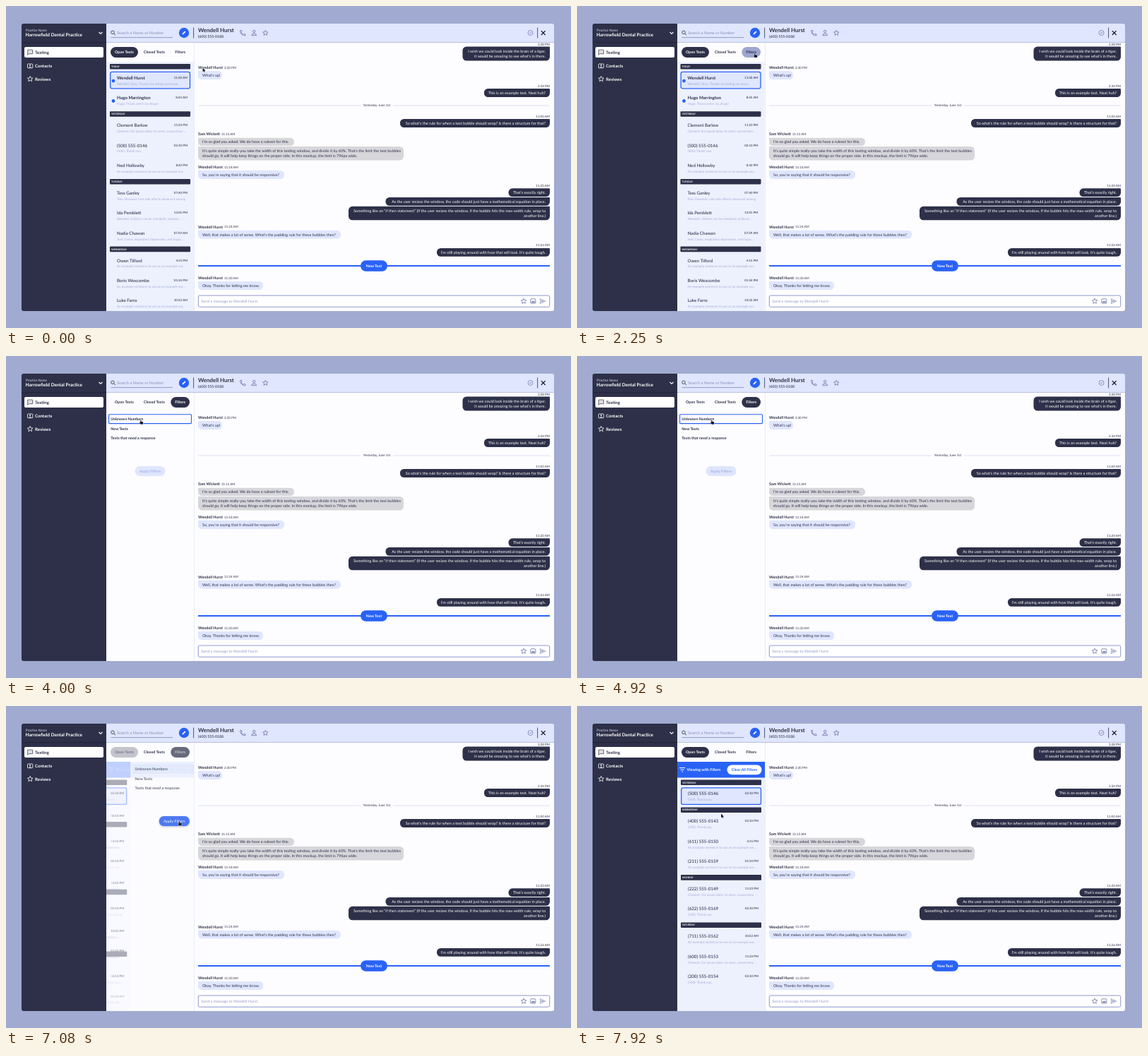
An HTML page with a canvas for the animation above (8 s loop, 800 px wide and 456 px high).

```html
<!DOCTYPE html>
<html lang="en">
<head>
<meta charset="utf-8">
<title>Texting inbox</title>
<style>
html, body { margin: 0; width: 100%; height: 100%; overflow: hidden; background: #a1abd1; }
canvas { display: block; width: 800px; height: 456px; }
</style>
</head>
<body>
<canvas id="stage"></canvas>
<script>
const LOOP = 8000;
const INK = '#2d3048', BLUE = '#2962f6', PALE = '#dfe6fd', WHITE = '#fdfdff';
const TINT = '#edf1fe', MUTED = '#a3abd3', ICON = '#6670a8', GREY = '#d6d6db';
const canvas = document.getElementById('stage');
const ctx = canvas.getContext('2d');
const dpr = window.devicePixelRatio || 1;
canvas.width = 800 * dpr;
canvas.height = 456 * dpr;
ctx.textRendering = 'geometricPrecision';

const mix = (a, b, k) => a + (b - a) * k;
const ease = (t, a, b) => {
  const k = Math.min(1, Math.max(0, (t - a) / (b - a)));
  return k * k * (3 - 2 * k);
};

function text(s, x, y, size, color = INK, weight = 400, align = 'left') {
  ctx.font = `${weight} ${size}px Lato, "Open Sans", sans-serif`;
  ctx.textAlign = align;
  ctx.fillStyle = color;
  ctx.fillText(s, x, y + size * 0.36);
}
const bold = (s, x, y, size, color, align) => text(s, x, y, size, color, 700, align);

function box(x0, y0, x1, y1, r, fill, stroke, width = 1) {
  ctx.beginPath();
  ctx.roundRect(x0, y0, x1 - x0, y1 - y0, r);
  if (fill) { ctx.fillStyle = fill; ctx.fill(); }
  if (stroke) { ctx.strokeStyle = stroke; ctx.lineWidth = width; ctx.stroke(); }
}

function line(color, width, ...p) {
  ctx.beginPath();
  for (let i = 0; i < p.length; i += 2) ctx.lineTo(p[i], p[i + 1]);
  ctx.strokeStyle = color;
  ctx.lineWidth = width;
  ctx.stroke();
}

function dot(x, y, r, fill, stroke, width = 0.8) {
  ctx.beginPath();
  ctx.arc(x, y, r, 0, Math.PI * 2);
  if (fill) { ctx.fillStyle = fill; ctx.fill(); }
  if (stroke) { ctx.strokeStyle = stroke; ctx.lineWidth = width; ctx.stroke(); }
}

function path(d, x, y, stroke, width, fill) {
  const p = new Path2D(d);
  ctx.save();
  ctx.translate(x, y);
  if (stroke) { ctx.strokeStyle = stroke; ctx.lineWidth = width; ctx.stroke(p); }
  if (fill) { ctx.fillStyle = fill; ctx.fill(p); }
  ctx.restore();
}

function star(x, y, r, color) {
  ctx.beginPath();
  for (let i = 0; i < 10; i++) {
    const a = i * Math.PI / 5, q = i % 2 ? r * 0.46 : r;
    ctx.lineTo(x + q * Math.sin(a), y - q * Math.cos(a));
  }
  ctx.closePath();
  ctx.strokeStyle = color;
  ctx.lineWidth = 0.8;
  ctx.stroke();
}

function faded(alpha, draw) {
  if (alpha <= 0) return;
  ctx.save();
  ctx.globalAlpha *= alpha;
  draw();
  ctx.restore();
}

function clipped(x0, y0, x1, y1, draw) {
  ctx.save();
  ctx.beginPath();
  ctx.rect(x0, y0, x1 - x0, y1 - y0);
  ctx.clip();
  draw();
  ctx.restore();
}

// Conversation lists: groups of [name, time, preview]
const SAMPLE = 'An example sentence to use as an example wo...';
const LOREM = 'Clement: Em ipsum dolor sit amet, consectetur ...';
const THANKS = '(500): Thank you.';
const inbox = layout(85.7, [
  ['TODAY', [
    ['Wendell Hurst', '11:30 AM', 'Wendell: Okay, Thanks for letting me know.'],
    ['Hugo Marrington', '8:45 AM', 'Hugo: Those aren’t my drugs!']]],
  ['YESTERDAY', [
    ['Clement Barlow', '11:23 PM', LOREM],
    ['(500) 555-0146', '02:10 PM', THANKS],
    ['Ned Hollowby', '8:42 PM', SAMPLE]]],
  ['TUESDAY', [
    ['Tess Ganley', '07:40 PM', 'Tess: However rare side effects observed among'],
    ['Ida Pemblett', '12:01 PM', 'Wendell: children can be metabolic acidosis...'],
    ['Nadia Chawan', '07:59 AM', 'Joel: Coma, respiratory depression, and hypo...']]],
  ['WEDNESDAY', [
    ['Owen Tilford', '4:15 PM', SAMPLE],
    ['Boris Wexcombe', '01:34 PM', SAMPLE],
    ['Luke Farro', '10:32 AM', SAMPLE]]]
]);
const filtered = layout(108.3, [
  ['YESTERDAY', [['(500) 555-0146', '02:10 PM', THANKS]]],
  ['WEDNESDAY', [
    ['(400) 555-0143', '02:10 PM', THANKS],
    ['(611) 555-0150', '4:15 PM', SAMPLE],
    ['(211) 555-0159', '01:34 PM', SAMPLE]]],
  ['MONDAY', [
    ['(222) 555-0149', '11:23 PM', LOREM],
    ['(622) 555-0169', '02:10 PM', THANKS]]],
  ['SATURDAY', [
    ['(711) 555-0162', '10:32 AM', SAMPLE],
    ['(600) 555-0153', '11:23 PM', LOREM],
    ['(200) 555-0154', '02:10 PM', THANKS]]]
]);

function layout(top, groups) {
  const bars = [], rows = [];
  let y = top;
  for (const [label, items] of groups) {
    bars.push({ label, y });
    y += 15.9;
    for (const [name, time, note] of items) {
      rows.push({ name, time, note, y });
      y += 28.4;
    }
    y += 23 - 28.4;
  }
  return { bars, rows };
}

function bar(label, y) {
  box(147, y - 3.8, 261, y + 3.8, 1, INK);
  text(label, 149, y, 3.5, '#fff', 700);
}

function row(r, y, unread) {
  if (unread) dot(152, y + 4.5, 2.4, BLUE);
  text(r.name, 157, y, 6.2, INK, unread ? 700 : 500);
  text(r.time, 257, y - 0.3, 4.4, INK, 500, 'right');
  text(r.note, 157, y + 8.5, 4.6, MUTED);
}

const selected = y => box(147.7, y - 8.3, 260.5, y + 15.2, 2.5, PALE, BLUE, 1.3);

function drawInbox() {
  box(142, 79, 266, 432, 0, TINT);
  inbox.bars.forEach(b => bar(b.label, b.y));
  selected(inbox.rows[0].y);
  inbox.rows.forEach((r, i) => row(r, r.y, i < 2));
}

// Rows of the inbox glide to the filtered layout while they swap text
function drawFiltered(p) {
  const shift = 22.6;
  faded(p, () => box(142, 79, 266, 432, 0, TINT));
  faded(mix(0.15, 1, p), () => {
    filtered.bars.forEach((b, i) => bar(b.label, mix(inbox.bars[i].y + shift, b.y, p)));
    selected(filtered.rows[0].y);
  });
  inbox.rows.forEach((r, i) => {
    const n = filtered.rows[i], y = mix(r.y + shift, n ? n.y : r.y + shift, p);
    faded((1 - p) * 0.45, () => row(r, y));
    if (n) faded(p, () => row(n, y));
  });
}

function filterBar() {
  box(142, 79, 266, 101.5, 0, BLUE);
  line('#fff', 1, 145, 87.6, 153, 87.6);
  line('#fff', 1, 146.5, 90.3, 151.5, 90.3);
  line('#fff', 1, 148, 93, 150, 93);
  bold('Viewing with Filters', 155.5, 90.3, 5.4, '#fff');
  box(212.5, 83.5, 261.5, 97.2, 6.8, '#fff');
  bold('Clear All Filters', 237, 90.3, 5.4, BLUE, 'center');
}

function filterPanel(t) {
  const hover = ease(t, 3670, 3950), on = ease(t, 4900, 5400), press = ease(t, 6670, 6880);
  box(142, 79, 266, 432, 0, WHITE);
  faded(on, () => box(145, 82.3, 263, 96, 1, PALE));
  faded(hover * (1 - on), () => box(145.6, 82.7, 262.5, 95.6, 1, null, BLUE, 1.1));
  ['Unknown Numbers', 'New Texts', 'Texts that need a response']
    .forEach((s, i) => bold(s, 148.3, 89 + i * 13.6, 5.35));
  box(182.5, 156, 225.5, 170, 7, PALE);
  bold('Apply Filters', 204, 163, 5.4, '#aab4e3', 'center');
  faded(on, () => {
    ctx.save();
    ctx.shadowColor = `rgba(45,48,72,${0.4 * press})`;
    ctx.shadowBlur = 3 * dpr;
    ctx.shadowOffsetY = dpr;
    box(182.5, 156, 225.5, 170, 7, BLUE);
    ctx.restore();
    faded(press, () => box(182.5, 156, 225.5, 170, 7, '#4d79f3'));
    bold('Apply Filters', 204, 163, 5.4, '#fff', 'center');
  });
}

function tab(s, x0, x1, on, hover = 0) {
  const x = (x0 + x1) / 2;
  faded(hover, () => box(x0, 58, x1, 73, 7.5, '#9ea7d0'));
  faded(on, () => box(x0, 58, x1, 73, 7.5, INK));
  faded(1 - on, () => bold(s, x, 65.4, 5.35, INK, 'center'));
  faded(on, () => bold(s, x, 65.4, 5.35, '#fff', 'center'));
}

function listPane(t) {
  const out = ease(t, 2230, 2750), back = ease(t, 6900, 7420);
  const panel = out - back;
  box(142, 52, 266, 432, 0, WHITE);
  clipped(142, 79, 266, 432, () => {
    const slide = draw => { ctx.save(); ctx.translate(-124 * panel, 0); draw(); ctx.restore(); };
    if (back > 0) {
      slide(() => drawFiltered(back));
      faded(back, filterBar);
    } else if (out < 1) {
      slide(() => faded(1 - out, drawInbox));
    }
    if (panel > 0) faded(panel, () => {
      ctx.translate(124 * (1 - panel), 0);
      filterPanel(t);
    });
  });
  tab('Open Texts', 148, 187, 1 - panel);
  tab('Closed Texts', 193, 227, 0);
  tab('Filters', 233.3, 260, panel, ease(t, 2000, 2180) * (1 - out));
}

function sidebar() {
  box(22, 25, 142, 432, [3, 0, 0, 3], INK);
  line('#1f2238', 1, 22, 51.7, 142, 51.7);
  text('Practice Name', 28, 34, 4.7, '#e3e6f5');
  bold('Harrowfield Dental Practice', 27.5, 40.8, 6.5, '#fff');
  line('#fff', 1.1, 131.5, 37, 134, 39.5, 136.5, 37);
  box(26, 58, 138, 73, 2, '#fff');
  bold('Texting', 41, 65.6, 6.1);
  bold('Contacts', 41, 84.6, 6.1, '#fff');
  bold('Reviews', 41, 103.6, 6.1, '#fff');
  path('M0 0H7V5.4H1.6L0 7Z', 30.7, 62.2, INK, 0.8);
  for (let i = 0; i < 3; i++) dot(32.4 + i * 1.8, 64.9, 0.5, INK);
  box(30.5, 82, 37.8, 87.8, 0.8, null, '#fff', 0.8);
  dot(34.1, 84, 1, '#fff');
  path('M0 1.5Q2 -.6 4 1.5Z', 32.1, 85.5, null, 0, '#fff');
  star(34.2, 103.4, 4, '#fff');
}

function header() {
  box(142, 25, 776, 52, [0, 3, 0, 0], PALE);
  line('#aab3d8', 0.8, 142, 51.6, 776, 51.6);
  dot(151, 37.3, 2.3, null, INK);
  line(INK, 0.9, 152.7, 39, 155, 41.3);
  text('Search a Name or Number', 157, 38, 5.75, '#8a93bd');
  line('#7d87b5', 0.8, 148.5, 44.6, 236, 44.6);
  dot(252, 38, 7.2, BLUE);
  path('M0 5L.4 3.2 3.7 0 5 1.3 1.7 4.6Z', 249.5, 35.5, null, 0, '#fff');
  line(INK, 0.8, 265.6, 30.5, 265.6, 45.5);
  line(INK, 0.8, 752.6, 30.5, 752.6, 45.5);
  bold('Wendell Hurst', 272, 34, 7.9);
  text('(600) 555-0188', 272, 43.3, 5.2, INK, 500);
  path('M.2 .3H2.2L2.7 2.5 1.6 3.4Q2.6 5.3 4.5 6.3L5.4 5.2 7.6 5.7V7.7Q1 7.8 .2 .3Z', 331.3, 34.2, ICON, 0.75);
  dot(351.2, 36, 1.7, null, ICON);
  path('M0 2.7Q0 0 3.4 0T6.8 2.7Z', 347.8, 39, ICON, 0.8);
  star(367.3, 38.2, 3.9, ICON);
  dot(742.5, 38, 3.5, null, ICON, 0.7);
  line(ICON, 0.7, 740.8, 38, 742, 39.2, 744.3, 36.8);
  line('#15172a', 1.2, 757.8, 35.2, 763.6, 41);
  line('#15172a', 1.2, 763.6, 35.2, 757.8, 41);
}

const CHAT = 5.45;

function sent(x, y0, y1, ...lines) {
  box(x, y0, 770, y1, [5.5, 1, 5.5, 5.5], INK);
  lines.forEach((s, i) =>
    text(s, 764, (y0 + y1) / 2 + (i - (lines.length - 1) / 2) * 7.5, CHAT, '#fff', 400, 'right'));
}

function received(x, y0, y1, fill, ...lines) {
  box(272, y0, x, y1, [1, 5.5, 5.5, 5.5], fill);
  lines.forEach((s, i) =>
    text(s, 278, (y0 + y1) / 2 + (i - (lines.length - 1) / 2) * 7.5, CHAT));
}

function sender(name, time, y) {
  bold(name, 272, y, CHAT);
  text(time, 274 + ctx.measureText(name).width, y, 4.5);
}
const stamp = (s, y) => text(s, 770, y, 4.5, INK, 400, 'right');

function chat() {
  const me = 'Wendell Hurst';
  box(266, 52, 776, 432, [0, 0, 3, 0], WHITE);
  line('#ccd2ea', 0.8, 266, 52, 266, 432);
  clipped(266, 52, 776, 432, () => stamp('2:28 PM', 54));
  sent(646.5, 57.5, 77.5, 'I wish we could look inside the brain of a tiger,', 'it would be amazing to see what’s in there.');
  sender(me, '2:30 PM', 87);
  received(306, 92, 104, PALE, 'What’s up!');
  stamp('2:34 PM', 113);
  sent(677, 117, 129, 'This is an example text. Neat huh?');
  line('#d5daf0', 0.8, 272, 141, 502, 141);
  line('#d5daf0', 0.8, 548, 141, 770, 141);
  text('Yesterday, June 1st', 525, 140.8, 4.6, INK, 400, 'center');
  stamp('11:00 AM', 156);
  sent(558, 160, 172, 'So what’s the rule for when a text bubble should wrap? Is there a structure for that?');
  sender('Sam Wickett', '11:15 AM', 181.5);
  received(408, 186.7, 198, GREY, 'I’m so glad you asked. We do have a ruleset for this.');
  received(563, 199, 218.5, GREY,
    'It’s quite simple really-you take the width of this texting window, and divide it by 60%. That’s the limit the text bubbles',
    'should go. It will help keep things on the proper side. In this mockup, the limit is 796px wide.');
  sender(me, '11:18 AM', 228);
  received(394, 233, 245, PALE, 'So, you’re saying that it should be responsive?');
  stamp('11:20 AM', 254);
  sent(711.5, 258.3, 270, 'That’s exactly right.');
  sent(537.5, 271, 282.8, 'As the user resizes the window, the code should just have a mathematical equation in place.');
  sent(485, 283.8, 303.3,
    'Something like an “if then statement” (If the user resizes the window, if the bubble hits the max-width rule, wrap to',
    'another line.)');
  sender(me, '11:24 AM', 312.6);
  received(474, 317.8, 329.6, PALE, 'Well, that makes a lot of sense. What’s the padding rule for these bubbles then?');
  stamp('11:26 AM', 338.6);
  sent(610, 343, 354.8, 'I’m still playing around with how that will look. It’s quite tough.');
  line(BLUE, 1.8, 272, 368, 770, 368);
  box(502, 360.3, 540, 375.8, 7.7, BLUE);
  bold('New Text', 521, 368, 5.35, '#fff', 'center');
  sender(me, '11:30 AM', 385.2);
  received(364, 390, 402, PALE, 'Okay. Thanks for letting me know.');
  box(272.3, 410, 769.7, 426.2, 2, '#fff', '#8f98cc', 1);
  text('Send a message to ' + me, 276.3, 418, CHAT, '#969ec6');
  star(733, 418, 4, ICON);
  box(742.8, 414.8, 749.8, 421.2, 0.8, null, ICON, 0.8);
  path('M0 3L1.7 .8 2.8 2 4 .3 5.6 3Z', 743.5, 417, null, 0, ICON);
  path('M0 0L7.4 3.4 0 6.8V4.2L4.6 3.4 0 2.6Z', 756.4, 414.6, ICON, 0.6);
}

// Pointer track: time, x, y
const track = [
  [0, 278.5, 87.5], [580, 251.5, 66.7], [2240, 251.5, 66.7], [2750, 275, 105],
  [3420, 191, 99], [3670, 191, 99], [3950, 190.5, 90.5], [5500, 190.5, 90.5],
  [5830, 216, 156.5], [6170, 213, 163], [6900, 213, 163], [7080, 245, 163],
  [7420, 246, 162], [7900, 204, 152.5], [LOOP, 204, 152.5]
];
const hands = [[2000, 2500], [3800, 5550], [6670, 7300]];
const ARROW = 'M0 0V5.8L1.3 4.6 2.2 6.6 3.2 6.1 2.3 4.2H4.1Z';
const HAND = 'M1.2 .6Q1.7 -.4 2.3 .6V2.2L4.6 2.8Q5.5 3.1 5.2 4.3L4.7 6.2H1.9L-.3 3.9Q0 3 1.2 3.7Z';

function pointer(t) {
  const i = track.findIndex(k => t < k[0]);
  const [t0, x0, y0] = track[i - 1], [t1, x1, y1] = track[i];
  const k = ease(t, t0, t1), x = mix(x0, x1, k), y = mix(y0, y1, k);
  const hand = hands.some(h => t >= h[0] && t < h[1]);
  if (hand) path(HAND, x - 1.5, y, '#fff', 0.9, '#15172a');
  else path(ARROW, x, y, '#fff', 0.9, '#15172a');
}

function frame(now) {
  const t = now % LOOP;
  ctx.setTransform(dpr, 0, 0, dpr, 0, 0);
  ctx.fillStyle = '#a1abd1';
  ctx.fillRect(0, 0, 800, 456);
  chat();
  header();
  listPane(t);
  sidebar();
  pointer(t);
}

let start = null;
function tick(now) {
  start ??= now;
  frame(Math.max(0, now - start));
  requestAnimationFrame(tick);
}
frame(0);
requestAnimationFrame(tick);
</script>
</body>
</html>
```
